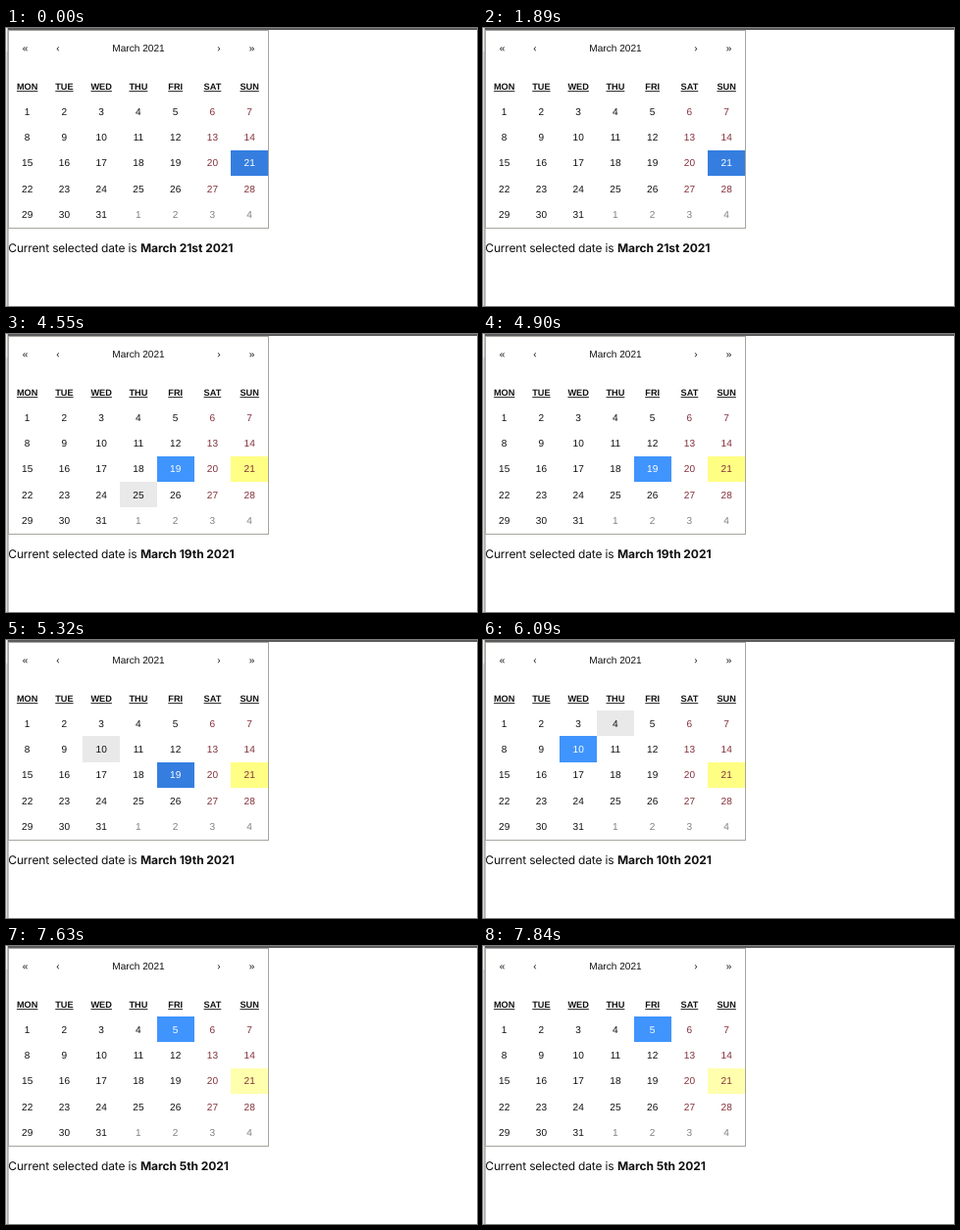
Write an HTML page that moves like this. It is 480 px wide and 284 px high and loops after 8 s.

```html
<!DOCTYPE html>
<html lang="en">
<head>
<meta charset="utf-8">
<title>Calendar</title>
<style>
  html, body { margin: 0; width: 100%; height: 100%; overflow: hidden; background: #fff; }
  svg { display: block; width: 480px; height: 284px; }
  text {
    font: 10.1px "Liberation Sans", Arial, sans-serif; fill: #111;
    text-anchor: middle; text-rendering: geometricPrecision;
  }
  .head { font-size: 9.2px; font-weight: bold; text-decoration: underline .8px; }
  .info { font: 12px Inter, Roboto, sans-serif; letter-spacing: -.015em; text-anchor: start; }
  .info tspan { font-weight: 700; letter-spacing: -.005em; }
</style>
</head>
<body>
<svg id="stage" viewBox="0 0 480 284"></svg>
<script>
const LOOP = 8000, TODAY = 21;
const CELL_W = 37.75, CELL_H = 26.4, LEFT = 2.8, TOP = 71.75;
const stage = document.getElementById('stage');

// start time, selected day, selection highlighted, hovered day
const states = [
  [0, 21, false, 0],
  [2170, 21, false, 19],
  [3430, 19, true, 19],
  [3850, 19, true, 26],
  [3920, 19, true, 0],
  [4550, 19, true, 25],
  [4620, 19, true, 18],
  [4900, 19, true, 0],
  [4970, 19, true, 10],
  [5320, 19, false, 10],
  [5530, 10, true, 10],
  [6020, 10, true, 11],
  [6090, 10, true, 4],
  [6160, 10, true, 0],
  [6510, 10, true, 5],
  [6930, 10, false, 5],
  [7140, 5, true, 5],
  [7630, 5, true, 21],
  [7700, 5, true, 28],
  [7840, 5, true, 21]
];

function add(tag, attrs, content = '') {
  const el = document.createElementNS('http://www.w3.org/2000/svg', tag);
  for (const key in attrs) el.setAttribute(key, attrs[key]);
  el.textContent = content;
  return stage.appendChild(el);
}
const rect = (x, y, width, height, fill) => add('rect', { x, y, width, height, fill });
const label = (x, y, content, cls = '') => add('text', { x, y, class: cls }, content);
const edgeX = col => Math.round(LEFT + col * CELL_W);
const edgeY = row => Math.round(TOP + row * CELL_H);
const centre = col => LEFT + (col + .5) * CELL_W;

rect(0, 0, 2, 24, '#f4f4f4');
rect(0, 24, 2, 260, '#dcdcdc');
rect(1.5, 0, 1, 284, '#858585');
rect(2, 0, 478, 2, '#5c5b5e');
add('rect', { x: 2.5, y: 2.5, width: 265, height: 202, fill: 'none', stroke: '#a6a69f' });

[[19.5, '«'], [53, '‹'], [135, 'March 2021'], [217, '›'], [250.5, '»']]
  .forEach(([x, mark]) => label(x, 23.6, mark));
['MON', 'TUE', 'WED', 'THU', 'FRI', 'SAT', 'SUN']
  .forEach((name, col) => label(centre(col), 63.2, name, 'head'));

const days = [];
for (let i = 0; i < 35; i++) {
  const col = i % 7, row = Math.floor(i / 7), day = i % 31 + 1;
  const x = edgeX(col), y = edgeY(row);
  const box = rect(x, y, edgeX(col + 1) - x, edgeY(row + 1) - y, 'none');
  const text = label(centre(col), TOP + row * CELL_H + 16.9, day);
  const ink = i > 30 ? '#808080' : col > 4 ? '#82303a' : '#111';
  text.style.fill = ink;
  if (i < 31) days.push({ day, box, text, ink });
}

const info = label(2.3, 228.8, 'Current selected date is ', 'info');
const date = document.createElementNS('http://www.w3.org/2000/svg', 'tspan');
date.setAttribute('x', 137);
info.appendChild(date);

function background(day, selected, bright, hover) {
  if (day === selected) return bright ? '#4094fd' : '#357ee0';
  if (day === TODAY) return day === hover ? '#ffffae' : '#ffff84';
  return day === hover ? '#e9e9e9' : 'none';
}

let shown;
function draw(now) {
  const t = now % LOOP;
  const state = states.findLast(s => s[0] <= t);
  if (state !== shown) {
    shown = state;
    const [, selected, bright, hover] = state;
    for (const { day, box, text, ink } of days) {
      box.setAttribute('fill', background(day, selected, bright, hover));
      text.style.fill = day === selected ? '#fff' : ink;
    }
    date.textContent = `March ${selected}${selected === 21 ? 'st' : 'th'} 2021`;
  }
  requestAnimationFrame(draw);
}
draw(0);
</script>
</body>
</html>
```
